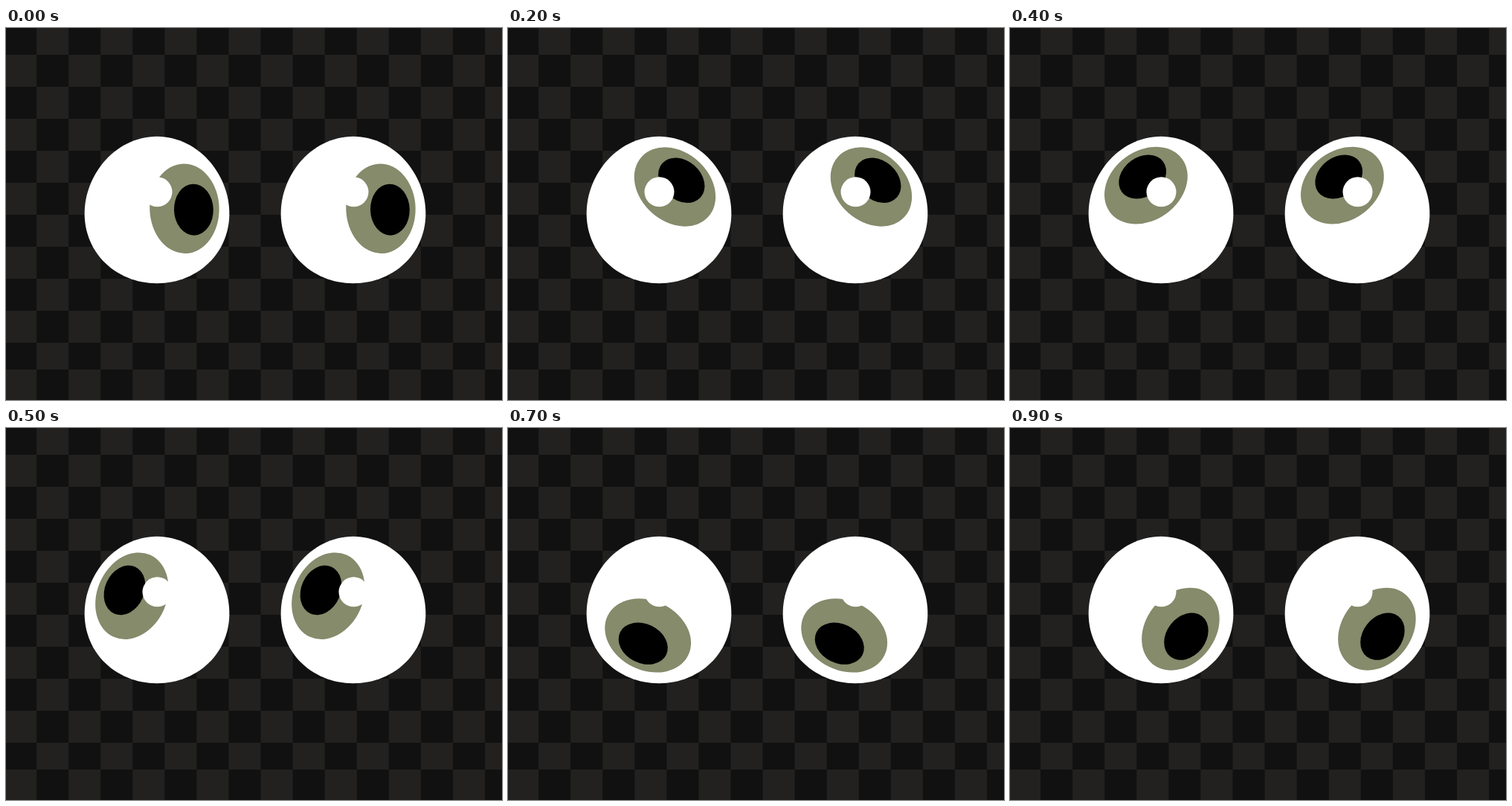
An HTML page with a canvas that plays this animation: 667 px wide and 500 px high, repeating every 1000 ms.

```html
<!DOCTYPE html>
<html lang="en">
<head>
<meta charset="utf-8">
<title>Rolling eyes</title>
<style>
  html, body { margin: 0; width: 100%; height: 100%; overflow: hidden; background: #111; }
  canvas { display: block; }
</style>
</head>
<body>
<canvas id="stage" width="667" height="500"></canvas>
<script>
const ctx = document.getElementById('stage').getContext('2d');
const STEP = 100;
const EYE_GAP = 264;
const CELL = 43;
const rad = deg => deg * Math.PI / 180;

// gaze direction in degrees for each step of one turn
const gaze = [-2, -27, -54, -88, -121, -151, -204, -248, -282, -316];

// slightly lumpy circle, narrower across its upper diagonals
function eyeballPath() {
  const path = new Path2D();
  for (let deg = 0; deg < 360; deg += 3) {
    const a = rad(deg);
    const r = 98 - 0.7 * Math.cos(2 * a) + 1.2 * Math.sin(3 * a);
    path.lineTo(203 + r * Math.cos(a), 245.7 + r * Math.sin(a));
  }
  path.closePath();
  return path;
}

const eyeball = eyeballPath();

function polar(x, y, r, deg) {
  return [x + r * Math.cos(rad(deg)), y + r * Math.sin(rad(deg))];
}

function ellipse([x, y], rx, ry, deg, color) {
  ctx.fillStyle = color;
  ctx.beginPath();
  ctx.ellipse(x, y, rx, ry, rad(deg), 0, Math.PI * 2);
  ctx.fill();
}

function drawChecks() {
  for (let row = 0; row < 12; row++) {
    // the pattern restarts below its eleventh row
    const y = row < 11 ? CELL * row - 7 : 459;
    ctx.fillStyle = '#111111';
    ctx.fillRect(0, y, 667, CELL);
    ctx.fillStyle = '#222120';
    for (let col = (row + 1) % 2; col < 16; col += 2) {
      ctx.fillRect(43.07 * col - 2, y, 43.07, CELL);
    }
  }
}

function drawEye(dx, dir) {
  const iris = polar(202.3, 244, 37.7, dir);
  const pupil = polar(...iris, 12.5, dir + 9);
  const tilt = dir + 90 - 6 * Math.sin(rad(2 * dir));
  ctx.save();
  ctx.translate(dx, 0);
  ctx.fillStyle = '#fff';
  ctx.fill(eyeball);
  ellipse(iris, 60.3, 46.7, tilt, '#858b6b');
  ellipse(pupil, 34.5, 26.4, tilt, '#000');
  ellipse([203.5, 220.3], 20, 20, 0, '#fff');
  ctx.restore();
}

function draw(time) {
  const dir = gaze[Math.floor(time / STEP) % gaze.length];
  drawChecks();
  drawEye(0, dir);
  drawEye(EYE_GAP, dir);
}

let start;
function tick(now) {
  start ??= now;
  draw(now - start);
  requestAnimationFrame(tick);
}
draw(0);
requestAnimationFrame(tick);
</script>
</body>
</html>
```
